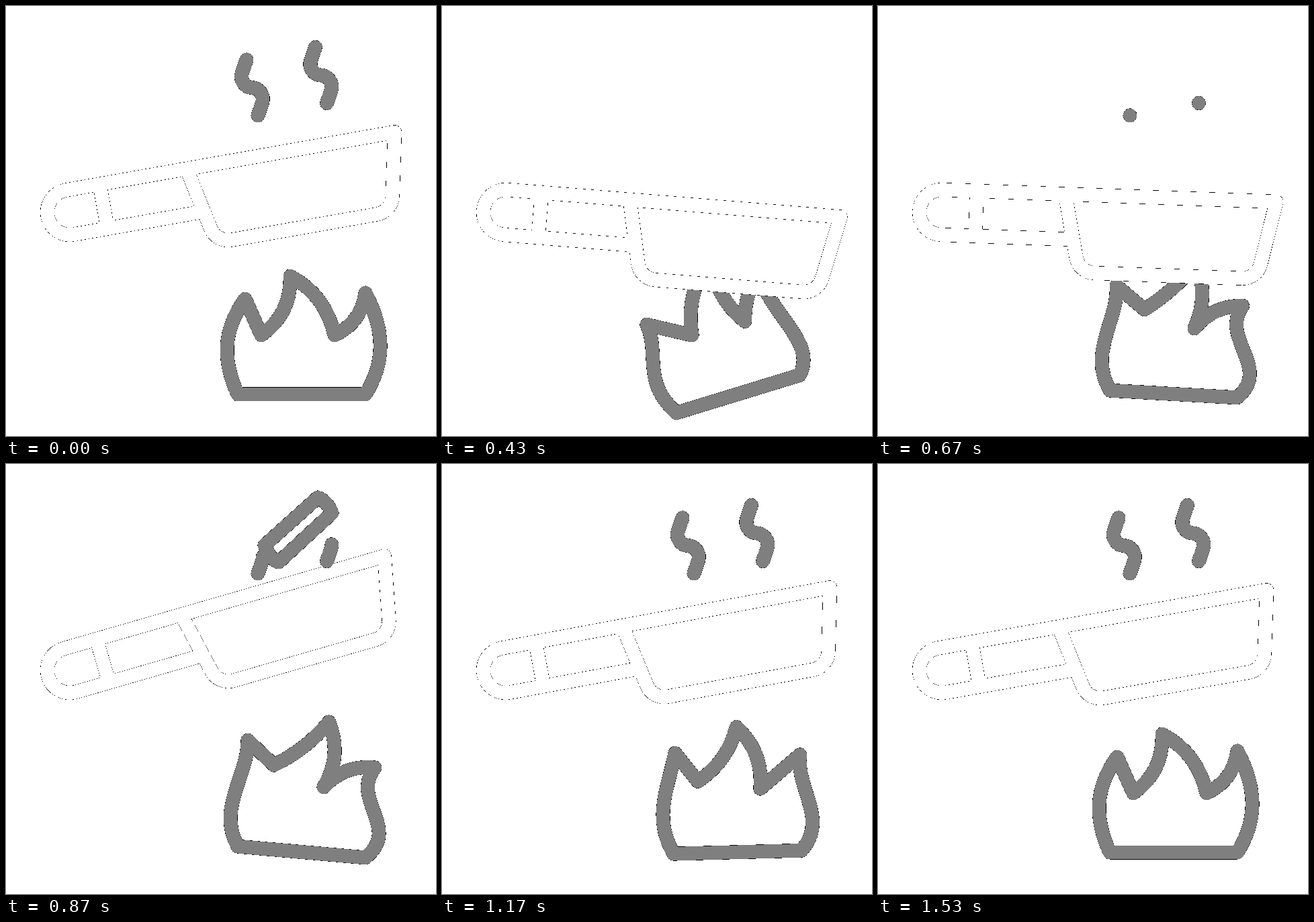
An HTML page for the animation above (1670 ms loop, 640 by 640 pixels).

```html
<!DOCTYPE html>
<html lang="en">
<head>
<meta charset="utf-8">
<title>Pan on a flame</title>
<style>
  html, body { margin: 0; width: 100%; height: 100%; overflow: hidden; background: #fff; }
  svg { display: block; width: 100vw; height: 100vh; }
  path { fill: none; stroke-linecap: round; stroke-linejoin: round; shape-rendering: crispEdges; }
  .edge { stroke: #000; stroke-width: 21; }
  .gray { stroke: #7f7f7f; stroke-width: 20.4; }
  .white { stroke: #fff; stroke-width: 20.4; }
  #pan .edge { fill: #fff; }
</style>
</head>
<body>
<svg viewBox="0 0 640 640">
  <g id="flame"></g>
  <g id="pan"></g>
  <g id="steam"></g>
</svg>
<script>
const LOOP = 1670;
const $ = id => document.getElementById(id);

// A stroked line with a hairline dark rim: one wide path under a narrower one.
function addLine(parent, d, tone, attrs = {}) {
  return ['edge', tone].map(cls => {
    const p = document.createElementNS('http://www.w3.org/2000/svg', 'path');
    p.setAttribute('class', cls);
    p.setAttribute('d', d);
    for (const k in attrs) p.setAttribute(k, attrs[k]);
    parent.appendChild(p);
    return p;
  });
}
const setAll = (els, name, value) => els.forEach(e => e.setAttribute(name, value));

const clamp = u => Math.min(1, Math.max(0, u));
const ease = u => u * u * (3 - 2 * u);
const ramp = (t, a, b) => ease(clamp((t - a) / (b - a)));
// Blends numbers, or arrays and objects of numbers
function mix(a, b, u) {
  if (typeof a === 'number') return a + (b - a) * u;
  if (Array.isArray(a)) return a.map((v, i) => mix(v, b[i], u));
  return Object.fromEntries(Object.keys(a).map(k => [k, mix(a[k], b[k], u)]));
}
// steps: [time, value], eased from each to the next
function follow(steps, t) {
  let i = 0;
  while (i < steps.length - 2 && t >= steps[i + 1][0]) i++;
  const [t0, a] = steps[i], [t1, b] = steps[i + 1];
  return mix(a, b, ramp(t, t0, t1));
}

// Pan, drawn level around the centre of the handle's round end
const pan = $('pan');
addLine(pan,
  'M182.4 -33.5H0A33.5 33.5 0 0 0 0 33.5H196.6' +
  'M182.4 -33.5L202.3 60.1A28 28 0 0 0 229.7 82.3H449.6A28 28 0 0 0 477 60.1L497 -33.5Z' +
  'M51 -33.5V33.5', 'white');
const tilt = [[0, -10], [467, 4.9], [612, 4.9], [867, -16.1], [1233, -10], [LOOP, -10]];

// Flame corners from bottom left to bottom right; bend arches the inner edges,
// sway turns the outer sides from bulging to S-shaped
const rest = { sway: 0, bend: [.27, -.23, .27],
  at: [[345, 578], [356, 436], [380, 490], [423, 402], [489, 490], [535, 427], [535, 578]] };
const blown = { sway: 1, bend: [-.22, .22, -.16],
  at: [[349, 606], [304, 475], [372, 490], [400, 375], [450, 469], [475, 385], [532, 549]] };
const right = { sway: 1, bend: [.11, -.25, -.25],
  at: [[345, 569], [360, 411], [399, 448], [481, 384], [473, 481], [549, 452], [535, 586]] };
const left = { sway: 1, bend: [.15, -.26, -.18],
  at: [[345, 584], [337, 429], [378, 462], [443, 384], [461, 478], [528, 434], [535, 571]] };
const poses = [[0, rest], [467, blown], [540, blown], [700, right], [860, right],
  [1050, left], [1290, mix(rest, right, .18)], [1530, rest], [LOOP, rest]];
const flame = addLine($('flame'), '', 'gray');

function arch([x0, y0], [x1, y1], bend) {
  const cx = (x0 + x1) / 2 - bend * (y1 - y0);
  const cy = (y0 + y1) / 2 + bend * (x1 - x0);
  return `Q${cx} ${cy} ${x1} ${y1}`;
}
function side(p, q, near, far) {
  const [x1, y1] = mix(p, q, .36), [x2, y2] = mix(p, q, .67);
  return `C${x1 + near} ${y1} ${x2 + far} ${y2} ${q}`;
}
function flamePath({ at, bend, sway }) {
  const inner = bend.map((b, i) => arch(at[i + 2], at[i + 3], b)).join('');
  return `M${at[0]}` + side(at[0], at[1], mix(-27, -37, sway), mix(-30, 6, sway)) +
    `L${at[2]}` + inner +
    side(at[5], at[6], mix(28, -32, sway), mix(31, 50, sway)) + 'Z';
}

// Steam wisps run from bottom to top; each flashes a loop shape while regrowing
const wisp = 'M375 163L381.5 144C385 133 377 122 366 121.5C355 121 347.5 110 351.5 99L358 80';
const wisps = [
  { move: '0 0', from: 865, to: 900,
    loop: 'M385 121L464 50Q479 56 485 73L406 146Q394 143 385 121Z' },
  { move: '102.5 -18.5', from: 1025, to: 1070,
    loop: 'M402 55Q416 42 433 44L468 145Q456 158 436 158Z' }
].map(w => {
  const steam = $('steam');
  const loop = addLine(steam, w.loop, 'gray');
  const line = addLine(steam, wisp, 'gray', { pathLength: 1, 'stroke-dasharray': '1 3',
    transform: `translate(${w.move})` });
  steam.append(loop[0], line[0], loop[1], line[1]);
  return { ...w, loop, line };
});

function drawSteam(t) {
  const gone = t >= 400 && t < 600;
  const offset = t < 400 ? -ramp(t, 0, 400) : 1 - Math.max(0.001, ramp(t, 725, 1170));
  for (const w of wisps) {
    setAll(w.line, 'visibility', gone ? 'hidden' : 'visible');
    setAll(w.line, 'stroke-dashoffset', offset);
    setAll(w.loop, 'visibility', t >= w.from && t < w.to ? 'visible' : 'hidden');
  }
}

function draw() {
  const t = performance.now() % LOOP;
  pan.setAttribute('transform', `translate(95 307) rotate(${follow(tilt, t)})`);
  setAll(flame, 'd', flamePath(follow(poses, t)));
  drawSteam(t);
  requestAnimationFrame(draw);
}
draw();
</script>
</body>
</html>
```
